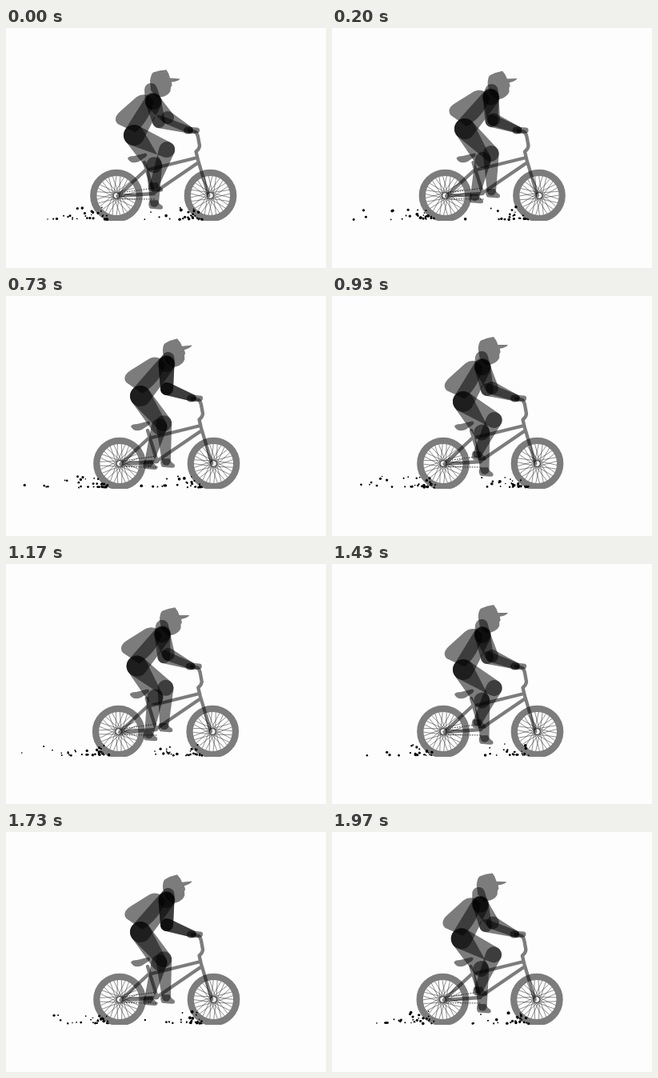
An HTML page with a canvas that plays this animation: 400 by 300 pixels, repeating every 2010 ms.

```html
<!DOCTYPE html>
<html>
<head>
<meta charset="utf-8">
<title>Cyclist</title>
<style>
  html, body { margin: 0; width: 100%; height: 100%; overflow: hidden; background: #fdfdfd; }
  canvas { display: block; }
</style>
</head>
<body>
<canvas id="stage" width="400" height="300"></canvas>
<script>
const ctx = document.getElementById('stage').getContext('2d');
const LOOP = 2010, FRAMES = 60, STRIDE = 15, GROUND = 241;
const TAU = Math.PI * 2, SHADE = 'rgba(0,0,0,0.51)';

let seed = 11;
const rnd = () => (seed = seed * 16807 % 2147483647) / 2147483647;

// Dirt thrown back from each tyre's contact point
const makeDirt = (x, reach) => Array.from({ length: 95 }, () => ({
  x: x - rnd() * 6,
  born: rnd() * FRAMES,
  life: 13 + rnd() * 9,
  dist: 14 + reach * rnd() ** 1.7,
  rise: 1 + 15 * rnd() ** 1.8,
  r: 0.8 + 1.2 * rnd() ** 1.4
}));
const dirt = [...makeDirt(130, 105), ...makeDirt(248, 75)];

// Swing through three key values at 0, 13/15 and 7/15 of a stride
function swing(p, v0, v1, v2) {
  const d1 = v1 - v0, d2 = v2 - v0;
  const b = -0.135 * d1 - 0.483 * d2, c = 0.215 * d2 - 1.286 * d1;
  return v0 + b * (Math.cos(p * TAU) - 1) + c * Math.sin(p * TAU);
}
const swingPoint = (p, a, b, c) => [0, 1].map(i => swing(p, a[i], b[i], c[i]));

function disc(x, y, r) {
  ctx.beginPath();
  ctx.arc(x, y, r, 0, TAU);
  ctx.fill();
}

// Tapered capsule between two joints
function limb([x1, y1], r1, [x2, y2], r2) {
  const dir = Math.atan2(y2 - y1, x2 - x1);
  const off = Math.acos((r1 - r2) / Math.hypot(x2 - x1, y2 - y1));
  ctx.beginPath();
  ctx.arc(x1, y1, r1, dir + off, dir - off + TAU);
  ctx.arc(x2, y2, r2, dir - off, dir + off);
  ctx.closePath();
  ctx.fill();
}

function kneeOf(hip, ankle, thigh, shin) {
  const dx = ankle[0] - hip[0], dy = ankle[1] - hip[1];
  const d = Math.min(Math.hypot(dx, dy), thigh + shin - 0.5);
  const along = (thigh * thigh - shin * shin + d * d) / (2 * d);
  const h = Math.sqrt(Math.max(0, thigh * thigh - along * along));
  return [hip[0] + (dx * along + dy * h) / d, hip[1] + (dy * along - dx * h) / d];
}

function wheel(x, spin) {
  const y = 209.5;
  ctx.strokeStyle = SHADE;
  ctx.lineWidth = 8.3;
  ctx.beginPath();
  ctx.arc(x, y, 28.7, 0, TAU);
  ctx.stroke();
  ctx.strokeStyle = '#333';
  ctx.lineWidth = 0.55;
  ctx.beginPath();
  for (let i = 0; i < 32; i++) {
    const rim = spin + i * TAU / 32, hub = rim + (i % 2 ? 1.3 : -1.3);
    ctx.moveTo(x + 3.5 * Math.cos(hub), y + 3.5 * Math.sin(hub));
    ctx.lineTo(x + 24.6 * Math.cos(rim), y + 24.6 * Math.sin(rim));
  }
  ctx.stroke();
}

function segment(x1, y1, x2, y2) {
  ctx.moveTo(x1, y1);
  ctx.lineTo(x2, y2);
}

function chainRun(offset, ...ends) {
  ctx.lineDashOffset = offset;
  ctx.beginPath();
  segment(...ends);
  ctx.stroke();
}

function bike(frame) {
  const spin = frame / FRAMES * TAU * 2;
  ctx.save();
  ctx.beginPath();
  ctx.rect(0, 0, 400, GROUND);
  ctx.clip();
  wheel(138, spin);
  wheel(255.5, spin + 0.1);
  ctx.restore();

  // One path, so that joints stay evenly shaded
  ctx.strokeStyle = ctx.fillStyle = SHADE;
  ctx.lineCap = ctx.lineJoin = 'round';
  ctx.lineWidth = 4.3;
  ctx.beginPath();
  segment(139.5, 210, 174, 178);
  segment(139.5, 210, 185, 207);
  segment(173, 168, 185, 207);
  segment(174, 178, 239, 162);
  segment(185, 206, 240, 168.5);
  ctx.moveTo(229, 128);
  ctx.lineTo(236, 129.5);
  ctx.quadraticCurveTo(239, 131, 240, 136);
  ctx.lineTo(242, 147);
  ctx.quadraticCurveTo(242, 151, 237.5, 154.5);
  ctx.lineTo(240, 165);
  ctx.lineTo(253.3, 209.5);
  ctx.stroke();

  // Saddle
  ctx.beginPath();
  ctx.moveTo(152, 163);
  ctx.quadraticCurveTo(153, 160, 160, 160);
  ctx.lineTo(174, 156.5);
  ctx.quadraticCurveTo(178, 157, 175, 161);
  ctx.lineTo(166, 167);
  ctx.quadraticCurveTo(156, 171, 152, 163);
  ctx.fill();

  ctx.strokeStyle = '#333';
  ctx.lineCap = 'butt';
  ctx.lineWidth = 1;
  ctx.setLineDash([1.6, 1.4]);
  chainRun(frame * 0.6, 139, 206.5, 185, 200);
  chainRun(-frame * 0.6, 139, 213.5, 186, 214);
  ctx.setLineDash([]);
}

function shoe([x, y]) {
  ctx.beginPath();
  ctx.moveTo(x - 6, y - 3);
  ctx.lineTo(x + 4, y - 3);
  ctx.quadraticCurveTo(x + 6, y + 2, x + 10, y + 4);
  ctx.quadraticCurveTo(x + 12, y + 8.5, x + 7, y + 8.5);
  ctx.lineTo(x - 5, y + 7.5);
  ctx.quadraticCurveTo(x - 9, y + 4, x - 6, y - 3);
  ctx.fill();
}

function backpack(hip, shoulder) {
  const len = Math.hypot(shoulder[0] - hip[0], shoulder[1] - hip[1]);
  const ux = (shoulder[0] - hip[0]) / len, uy = (shoulder[1] - hip[1]) / len;
  const at = (u, n) => [hip[0] + ux * u + uy * n, hip[1] + uy * u - ux * n];
  ctx.beginPath();
  ctx.moveTo(...at(4, 0));
  ctx.lineTo(...at(2, 24));
  ctx.quadraticCurveTo(...at(3, 30), ...at(9, 31));
  ctx.quadraticCurveTo(...at(13, 31.5), ...at(18, 29.5));
  ctx.lineTo(...at(43, 21));
  ctx.quadraticCurveTo(...at(50, 18), ...at(52, 10));
  ctx.lineTo(...at(50, 0));
  ctx.quadraticCurveTo(...at(28, -8), ...at(4, 0));
  ctx.fill();
}

function head(p) {
  ctx.save();
  ctx.translate(194 + swing(p, 0, 3, 16.5), 70 + swing(p, 0, -0.7, 2));
  ctx.rotate(swing(p, 0, -0.08, -0.17));
  ctx.beginPath();
  ctx.moveTo(-14, -4);
  ctx.quadraticCurveTo(-13, -12, -10, -14.5);
  ctx.quadraticCurveTo(-2, -17.5, 6.5, -17.8);
  ctx.quadraticCurveTo(10, -13, 11, -7.5);
  ctx.lineTo(23.5, -6.5);
  ctx.quadraticCurveTo(22, -3.5, 13, -2.5);
  ctx.lineTo(13.5, 2);
  ctx.lineTo(12, 4);
  ctx.lineTo(11.5, 9);
  ctx.quadraticCurveTo(9, 14, 2, 16);
  ctx.lineTo(-5, 17);
  ctx.lineTo(-13, 8);
  ctx.closePath();
  ctx.fill();
  ctx.restore();
}

function rider(p, crank, dx) {
  const hip = swingPoint(p, [160, 134], [164, 132], [168, 125]);
  const shoulder = swingPoint(p, [184, 92], [188, 89], [200.5, 85]);
  const neck = swingPoint(p, [181, 77], [187, 77], [202.5, 78]);
  const elbows = [
    swingPoint(p, [202, 112], [200, 115], [201, 116]),
    swingPoint(p, [191, 117], [194, 117], [201, 116])
  ];
  const hand = [229.5 + dx, 127.5];

  ctx.fillStyle = SHADE;
  backpack(hip, shoulder);
  limb(hip, 13, shoulder, 11);
  limb(shoulder, 10, neck, 8);
  head(p);
  for (const side of [0, Math.PI]) {
    const a = crank + side;
    const ankle = [185.5 + dx + 11 * Math.sin(a), 207.3 - 11 * Math.cos(a)];
    const knee = kneeOf(hip, ankle, 45, 47);
    limb(hip, 13, knee, 10);
    limb(knee, 10, ankle, 5.5);
    shoe(ankle);
  }
  for (const elbow of elbows) {
    limb(shoulder, 10, elbow, 8);
    limb(elbow, 8, hand, 4.3);
  }
  limb([hand[0] - 3, hand[1] + 0.5], 4.5, [hand[0] + 9, hand[1] + 0.5], 3.6);
}

function drawDirt(frame) {
  ctx.fillStyle = '#000';
  for (const d of dirt) {
    const age = ((frame - d.born + FRAMES) % FRAMES) / d.life;
    if (age > 1) continue;
    disc(d.x - d.dist * age, 239.5 - 4 * d.rise * age * (1 - age), d.r);
  }
}

function draw(ms) {
  const frame = Math.min(FRAMES - 1, Math.floor((Math.floor(ms / 10) * 3 + 1) / 10));
  const p = frame % STRIDE / STRIDE;
  const crank = frame / STRIDE * Math.PI;
  const dx = swing(p, 0, 1, 4);
  ctx.fillStyle = '#fdfdfd';
  ctx.fillRect(0, 0, 400, 300);
  ctx.save();
  ctx.translate(dx, 0);
  bike(frame);
  ctx.restore();
  rider(p, crank, dx);
  drawDirt(frame);
}

const start = performance.now();
function tick() {
  draw((performance.now() - start) % LOOP);
  requestAnimationFrame(tick);
}
tick();
</script>
</body>
</html>
```
